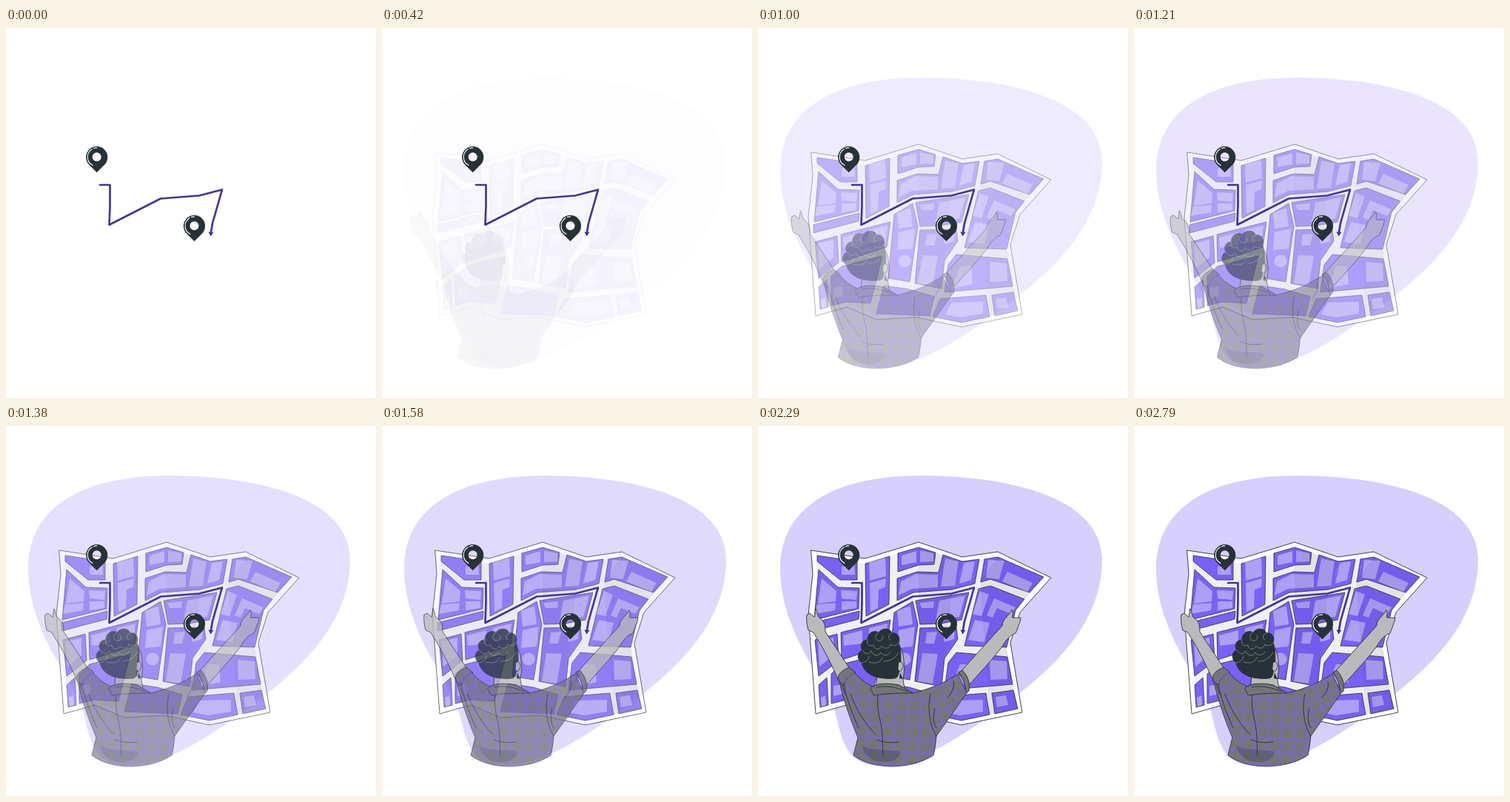
An HTML page for the animation above (2830 ms loop, 500 by 500 pixels).

```html
<!DOCTYPE html>
<html lang="en">
<head>
<meta charset="utf-8">
<title>Reading a map</title>
<style>
  html, body { margin: 0; width: 100%; height: 100%; overflow: hidden; background: #fff; }
  svg { display: block; width: 100%; height: 100%; }
  .ink { stroke: #263238; stroke-width: .9; stroke-linejoin: round; stroke-linecap: round; }
  .line { fill: none; }
  .block { fill: #7a60f8; stroke: #263238; stroke-width: .8; stroke-linejoin: round; }
  .light { fill: #ebebeb; fill-opacity: .45; }
  .skin { fill: #bababa; }
  .shirt { fill: #757575; }
  .plaid { fill: #7a60f8; fill-opacity: .42; }
  .curl { fill: none; stroke: #a5adb1; stroke-width: .6; stroke-linecap: round; }
  .route { fill: none; stroke: #44349a; stroke-width: 2.7; stroke-linejoin: round; stroke-linecap: round; }
</style>
</head>
<body>
<svg viewBox="0 0 500 500">
  <defs>
    <pattern id="plaidBack" width="17.5" height="18" patternUnits="userSpaceOnUse" patternTransform="translate(147 364) rotate(3)">
      <path class="plaid" d="M0 0H4.5V18H0ZM0 0H17.5V4.5H0Z"/>
    </pattern>
    <pattern id="plaidLeft" width="15" height="16" patternUnits="userSpaceOnUse" patternTransform="translate(112 340) rotate(-24)">
      <path class="plaid" d="M0 0H4V16H0ZM0 0H15V4H0Z"/>
    </pattern>
    <pattern id="plaidRight" width="15" height="16" patternUnits="userSpaceOnUse" patternTransform="translate(240 350) rotate(-22)">
      <path class="plaid" d="M0 0H4V16H0ZM0 0H15V4H0Z"/>
    </pattern>
    <g id="pin">
      <path fill="#263238" fill-rule="evenodd" d="M0 21L-10.5 10.5A14.6 14.6 0 1 1 10.5 10.5ZM-6 0A6 6 0 1 0 6 0A6 6 0 1 0 -6 0Z"/>
      <path fill="none" stroke="#fff" stroke-width="1.1" stroke-linecap="round" d="M-5.5 11.2A12.4 12.4 0 0 1 -6.4 -10.6M-4.2 -11.7A12.4 12.4 0 0 1 0 -12.4"/>
    </g>
  </defs>

  <path class="fade" fill="#d7cffc" d="M30 193C30 118 90 67 222 67C350 68 465 100 465 181C465 265 400 325 350 364C300 402 225 459 165 459C105 459 115 400 95 362C75 325 30 265 30 193Z"/>

  <g class="fade">
    <path class="ink" fill="#fff" d="M72 168L145 179L217 157L276 177L324 170L396 205L354 252L341 293L357 387L275 404L214 391L160 394L120 377L78 389L68 255L74 200Z"/>
    <path fill="#f0f0f0" d="M79 175L145 186L217 164L276 183L324 177L386 204L348 249L335 293L351 382L275 398L214 385L160 388L120 371L84 381L75 255L80 200Z"/>

    <g class="block">
      <path d="M80 175L134 183V208H111L80 183Z"/>
      <path d="M82 194L108 218L137 219L136 247L76 262Z"/>
      <path d="M75 266L137 250L136 261L75 277Z"/>
      <path d="M145 186L178 176L177 241L146 257Z"/>
      <path d="M189 172L217 164L240 171L238 187L217 188L189 197Z"/>
      <path d="M188 206L215 197L244 198L250 174L276 183L299 180L293 213L262 221L210 225L188 236Z"/>
      <path d="M306 180L324 177L386 204L367 225L314 207L301 211Z"/>
      <path d="M298 220L314 216L360 234L348 249L336 299L279 297Z"/>
      <path d="M213 236L285 225L275 262L247 267L219 268Z"/>
      <path d="M219 273L268 272L270 288L252 314L248 352L212 345Z"/>
      <path d="M184 252L209 237L216 268L205 343L176 338Z"/>
      <path d="M77 289L107 281L109 317L82 338Z"/>
      <path d="M112 279L179 262L174 296L113 316Z"/>
      <path d="M82 350L93 340L95 377L84 380Z"/>
      <path d="M99 335L113 322L168 308L152 372L120 370L99 375Z"/>
      <path d="M170 348L204 353L238 363L232 389L160 386Z"/>
      <path d="M268 306L337 312L344 349L252 357L257 320Z"/>
      <path d="M246 366L308 361L313 390L275 398L236 390Z"/>
      <path d="M316 361L345 357L351 382L320 389Z"/>
    </g>

    <g class="light">
      <path d="M113 190L130 187L131 201H113ZM86 206L106 223L105 237L81 240ZM112 222L134 223L133 235L113 233ZM80 241L105 239L104 249L77 254ZM113 237H133V246L113 249Z"/>
      <path d="M150 184L172 178L173 203L151 209ZM151 212L173 206L172 218L163 221L162 246L152 251ZM194 175L214 169V184L194 188ZM219 168L237 172V183L219 184Z"/>
      <path d="M193 210L213 200L243 201V218L208 220L190 229ZM253 179L271 183L266 216L247 217ZM278 185L293 183L288 208L272 213Z"/>
      <path d="M311 181L333 182L326 207L308 205ZM337 197L371 212L364 224L330 210Z"/>
      <path d="M300 223L312 228L302 257L290 254ZM319 233L348 245L342 254L323 246L317 259L309 256ZM293 262L313 266L306 292L284 289Z"/>
      <path d="M218 239L238 237L237 246L221 246ZM245 236L280 229L272 258L240 263ZM228 279L242 278L238 294L226 294ZM222 307L243 308L236 348L216 345ZM252 275H266L265 288L251 292Z"/>
      <path d="M188 250L206 243L209 268L190 271ZM190 276L212 271L209 298L188 300Z"/>
      <circle cx="198" cy="315" r="8.5"/>
      <path d="M81 291L102 286V310L83 325ZM115 283L141 276V294L116 297ZM150 273L175 267L172 288L150 291ZM85 367L91 364L92 377L86 379ZM102 351L114 349L115 362L102 365Z"/>
      <path d="M273 322H288L290 346L262 352ZM313 316L336 318L337 342L314 343ZM262 371L304 370V386L273 391L253 387ZM321 366L335 364L338 377L323 380Z"/>
    </g>
    <path fill="#000" fill-opacity=".05" d="M324 177L386 204L348 249L335 293L351 382L313 390L300 210ZM217 164L276 183L262 226L252 314L248 352L212 345L217 268Z"/>
  </g>

  <path class="route" d="M127 212H140.500V240L139.500 266L209 230.500L261 226.500L292 218.500L279 264L277 276"/>
  <path fill="#44349a" d="M273.500 275.500L280.500 276L276.500 281.500Z"/>
  <use href="#pin" x="122.700" y="174.300"/>
  <use href="#pin" x="254.500" y="267.300"/>

  <g id="man" class="fade">
    <g class="ink skin">
      <path d="M76 247C79 252 78 258 82 260C88 264 89 270 89 278L122 328L108 346C97 322 87 301 77 286L73 279L66 276C64 268 63 260 64 255L68 253L74 258Z"/>
      <path d="M341 249C344 252 341 256 342 259L353 259C353 265 350 268 349 273L346 280C338 283 334 288 328 298C316 314 301 330 284 349L269 335L328 270C328 261 336 258 341 249Z"/>
      <path d="M160 330L188 296C193 304 195 311 195 318L196 326L194 343L196 354L178 364L158 352Z"/>
    </g>
    <path class="ink" fill="#263238" d="M138 320C131 315 132 305 139 303C135 297 138 289 146 289C146 280 154 275 161 279C166 272 177 273 179 280C187 278 191 287 188 293C191 299 191 308 191 317L189 328C188 336 187 341 182 341C175 342 167 341 161 340C148 337 140 330 138 320Z"/>
    <path class="curl" d="M146 289C144 295 149 299 154 296C155 303 163 303 165 297C169 302 176 301 177 295C181 298 186 297 188 293M161 279C156 281 155 288 160 290C165 291 169 287 166 283M179 280C174 281 173 287 177 289M139 303C142 309 149 309 151 304C154 311 161 312 164 306C167 311 174 311 177 305M138 320C144 319 148 315 148 311M148 319C157 322 164 319 166 313M168 318C176 318 184 314 188 306"/>
    <path class="ink skin" d="M188 320C192 316 196 322 193 328C192 332 188 333 187 328Z"/>
    <path fill="#263238" d="M190 333L194 342L189 341Z"/>

    <g class="ink shirt">
      <path d="M128 333C136 342 144 348 153 352C160 348 170 348 188 350L207 361C232 355 252 346 268 335L280 361L239 419C238 429 237 438 235 445C222 453 207 459 180 460C159 460 140 455 127 445L133 421C124 400 113 369 108 345Z"/>
      <path d="M107 344C105 337 108 332 121 326L130 333C121 337 115 343 114 350Z"/>
      <path d="M269 333L274 330C281 337 285 346 283 358L279 362C279 351 275 341 269 333Z"/>
    </g>
    <path fill="url(#plaidBack)" d="M132 348L155 364L207 361L230 362L229 400L239 419L235 445C222 453 207 459 180 460C159 460 140 455 127 445L133 421L131 395Z"/>
    <path fill="url(#plaidLeft)" d="M128 333L135 350L131 395L133 421C124 400 113 369 108 345Z"/>
    <path fill="url(#plaidRight)" d="M230 355L268 335L280 361L239 419L229 400Z"/>
    <path fill="#263238" fill-opacity=".28" d="M138 432C152 440 174 436 190 440C190 452 172 457 158 453C148 450 141 443 138 432Z"/>
    <path class="ink shirt" d="M150 354C158 347 174 347 188 350L207 361C190 361 173 361 155 364Z"/>
    <path class="ink line" d="M159 353C173 350 188 354 200 359M160 364C158 377 161 389 164 402C167 418 166 432 167 445M114 349C118 370 126 390 134 408M123 362C133 389 147 407 157 417M159 424C170 429 180 428 188 427M231 362C227 382 229 403 239 419M237 382C234 393 235 402 239 408M262 345C264 352 261 360 254 367M111 349L116 363"/>
  </g>
</svg>
<script>
  const LOOP = 2830, START = 330, FADE = 1650, SWING = 2070;
  const man = document.getElementById('man');
  const fading = document.querySelectorAll('.fade');

  function draw(now) {
    const t = Math.max(0, now % LOOP - START);
    const opacity = Math.min(1, t / FADE);
    const shift = -11.4 - 13.6 * Math.cos(Math.PI * t / SWING);
    fading.forEach(part => part.setAttribute('opacity', opacity));
    man.setAttribute('transform', `translate(${shift} 0)`);
  }

  const begin = performance.now();
  function tick() {
    draw(performance.now() - begin);
    requestAnimationFrame(tick);
  }
  tick();
</script>
</body>
</html>
```
